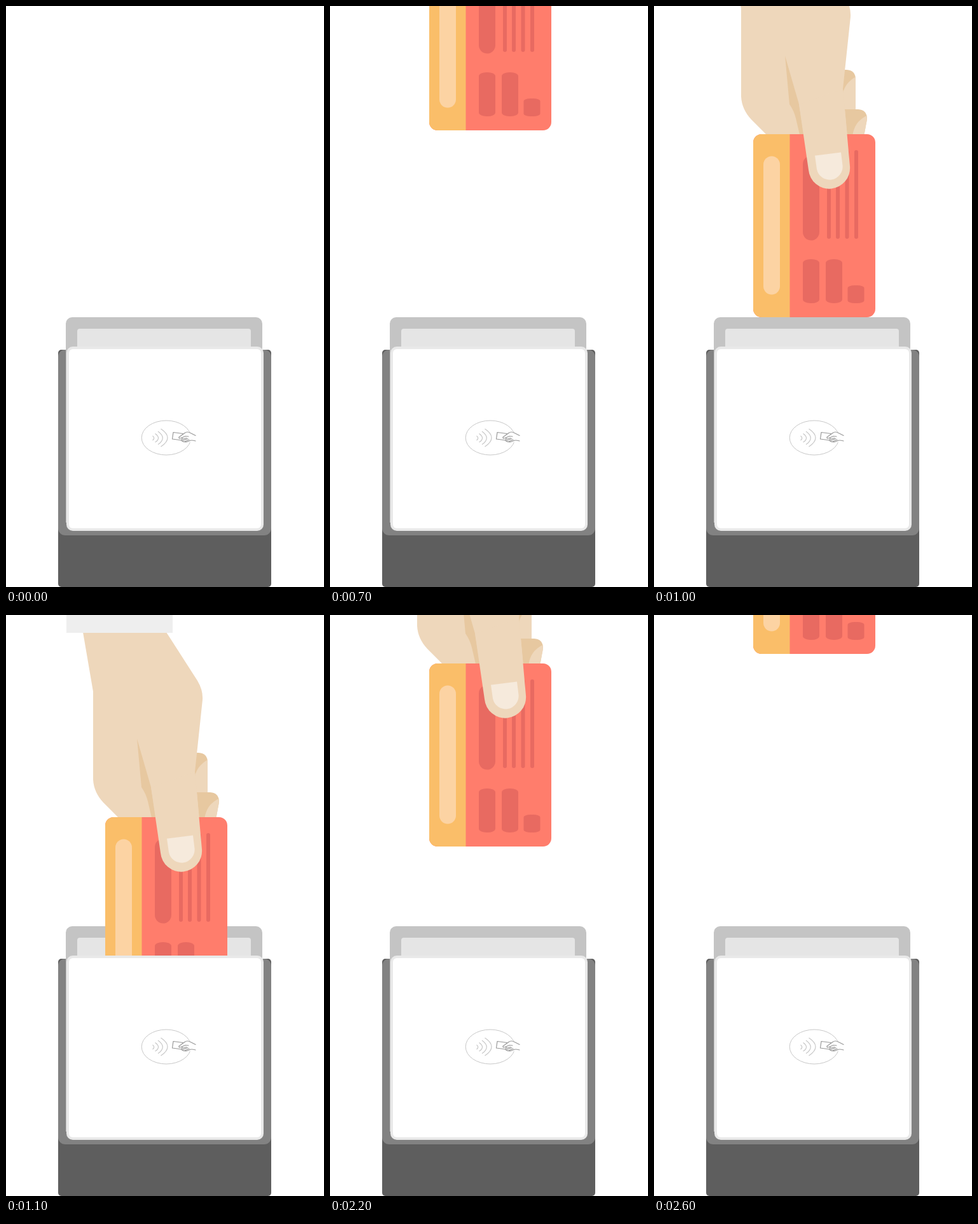
An HTML page that plays this animation: 500 px wide and 911 px high, repeating every 2700 ms.

```html
<!DOCTYPE html>
<html lang="en">
<head>
<meta charset="utf-8">
<title>Card reader</title>
<style>
  html, body { margin: 0; height: 100%; overflow: hidden; background: #fff; }
  svg { display: block; width: 100%; height: 100%; }
  .skin { fill: #eed7bb; }
  .shade { fill: #e7c8a0; }
  .print { fill: #e86a61; }
  .line { fill: none; stroke: #c8c8c8; }
  .ink { fill: #fff; stroke: #999; stroke-width: 1.2; stroke-linejoin: round; stroke-linecap: round; }
</style>
</head>
<body>
<svg viewBox="0 0 500 911">
  <!-- reader body and tray -->
  <rect x="82" y="539" width="335" height="372" rx="5" fill="#5e5e5e"/>
  <rect x="82" y="539" width="335" height="291" rx="11" fill="#828282"/>
  <path d="M94 810V498a10 10 0 0 1 10-10H393a10 10 0 0 1 10 10V810z" fill="#c4c4c4"/>
  <rect x="112" y="506" width="273" height="60" rx="4" fill="#e5e5e5"/>

  <g id="hand" visibility="hidden">
    <!-- back of the hand and fingers -->
    <path class="shade" d="M290 216H303Q317 217 317 231V317H290z"/>
    <path class="skin" d="M317 227Q300 237 297 253V317H317z"/>
    <path class="shade" d="M296 278H321Q335 279 335 293L330 320H296z"/>
    <path class="skin" d="M334.500 288Q315 297 312 320H330L335 294z"/>
    <path class="skin" d="M121 27H252L301 103Q310 118 309 133L297 246L304 320H179L153 294Q138 278 137 258V120z"/>
    <path class="shade" d="M206 194L228 270L236 320H229.500L223 292Q220 280 213 270z"/>
    <rect x="95" y="-40" width="167" height="68" fill="#eee"/>

    <!-- card -->
    <rect x="156" y="317" width="192" height="287" rx="13" fill="#ff7d6c"/>
    <path d="M213.500 317H169a13 13 0 0 0-13 13V591a13 13 0 0 0 13 13H213.500z" fill="#fabe69"/>
    <rect x="172" y="351.500" width="26" height="217" rx="13" fill="#fcd3a3"/>
    <g class="print">
      <rect x="234" y="351" width="26" height="132.500" rx="13"/>
      <rect x="272" y="342" width="6" height="139" rx="3"/>
      <rect x="286" y="342" width="6" height="139" rx="3"/>
      <rect x="300.500" y="342" width="6" height="139" rx="3"/>
      <rect x="315" y="342" width="6" height="139" rx="3"/>
      <rect x="234" y="513" width="26" height="69" rx="12" ry="6"/>
      <rect x="270" y="513" width="26" height="69" rx="12" ry="6"/>
      <rect x="304.500" y="554" width="26" height="28" rx="11" ry="4"/>
    </g>

    <!-- thumb -->
    <path class="skin" d="M228 270L243 373A32.500 32.500 0 0 0 308 367L300 278L297 246z"/>
    <path d="M253 350.500L294 345.500L296.500 366A20.500 20.500 0 0 1 256 372z" fill="#f6eadc"/>
  </g>

  <!-- front panel -->
  <rect x="95" y="534" width="310" height="289" rx="10" fill="#e9e9e9"/>
  <rect x="99" y="538" width="302" height="281" rx="6" fill="#fff"/>

  <!-- contactless sign -->
  <ellipse class="line" cx="252" cy="677" rx="38.800" ry="27"/>
  <path class="line" stroke-width="1.200" d="M230.500 674q4.500 3.500 0 7M234.500 670.500q10 7 0 13.500M239 667q14.500 10.500 0 20.500M243.500 663q21 14 0 28"/>
  <path d="M279 671L285 667.500L298 674V682L290 684L279 682z" fill="#fff"/>
  <path class="ink" d="M263 668.500L278 670.500L276.500 681L261.500 679z"/>
  <path class="ink" d="M298 673.500L290 669.500Q285 666.500 281 669.500L272 676Q271 678.500 275 677.500L282 674.500L287 675M298 682Q291 680 288 682L284 683.500Q279 684 276 681.500Q275 679.500 278 679L284 677.500M277 681.500L286 678.500M281 683L288 680"/>
</svg>
<script>
  const LOOP = 2700, STEP = 100, CARD_BOTTOM = 604;
  const stops = [61, 126, 195, 277, 363, 488, CARD_BOTTOM];
  const hand = document.getElementById('hand');

  function draw() {
    const tick = Math.floor(performance.now() % LOOP / STEP);
    // down from tick 5, hold at the last stop, back up until tick 26
    const stop = Math.min(tick - 5, 26 - tick, stops.length - 1);
    hand.setAttribute('visibility', stop < 0 ? 'hidden' : 'visible');
    if (stop >= 0) hand.setAttribute('transform', `translate(0 ${stops[stop] - CARD_BOTTOM})`);
    requestAnimationFrame(draw);
  }
  draw();
</script>
</body>
</html>
```
